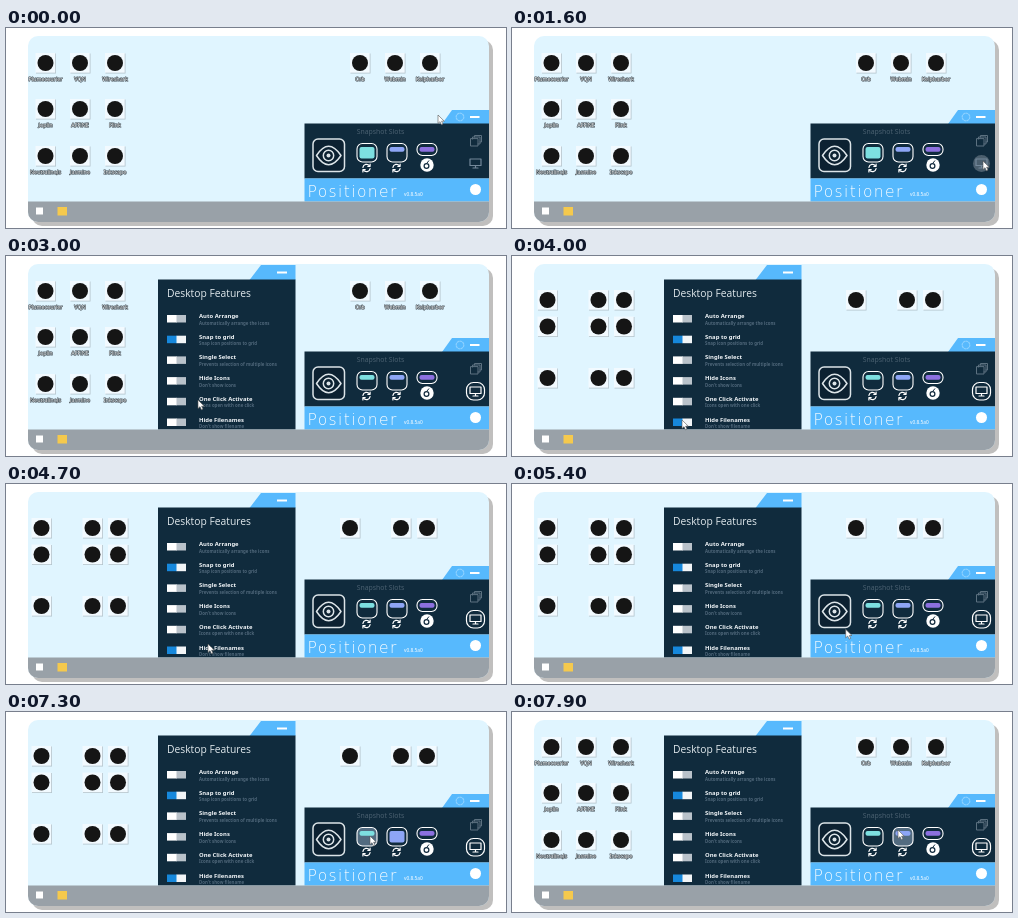
An HTML page that plays this animation: 500x200 px, repeating every 8000 ms.

```html
<!DOCTYPE html>
<html lang="en">
<head>
<meta charset="utf-8">
<title>Desktop icon positions</title>
<style>
html, body { margin: 0; width: 100%; height: 100%; overflow: hidden; background: #fff; }
svg { display: block; width: 500px; height: 200px; }
text { font-family: "Noto Sans", "Open Sans", sans-serif; }
.label { font-size: 5.4px; fill: #fff; text-anchor: middle; paint-order: stroke; stroke: #38434b; stroke-width: 1.1px; stroke-linejoin: round; }
.heading { font: 10.3px "Open Sans", "Noto Sans", sans-serif; fill: #e2eaee; }
.option { font-size: 5.9px; font-weight: 600; fill: #f3f7fa; }
.hint { font-size: 4.4px; font-weight: 600; fill: #50687b; }
.brand { font: 200 15.5px "DejaVu Sans", sans-serif; letter-spacing: 1.4px; fill: #fff; }
.line { fill: none; stroke: #fff; stroke-width: 1.2; stroke-linecap: round; stroke-linejoin: round; }
.dim { stroke: #5c7180; stroke-width: 1; }
.eye { stroke: #dce4e8; stroke-width: 1.5; }
</style>
</head>
<body>
<svg viewBox="0 0 500 200">
  <defs>
    <clipPath id="screen"><rect x="22" y="8" width="461" height="186" rx="10"/></clipPath>
    <g id="refresh" class="line">
      <path d="M-3.6 -.6A3.7 3.7 0 0 1 3 -2.2M3.6 .6A3.7 3.7 0 0 1 -3 2.2"/>
      <path d="M3.6 -4V-1.7H1.3M-3.6 4V1.7H-1.3"/>
    </g>
  </defs>
  <rect x="26" y="12" width="461" height="186" rx="10" fill="#c0bfbe"/>
  <g clip-path="url(#screen)">
    <rect x="22" y="8" width="461" height="186" fill="#e0f5ff"/>
    <g id="icons"></g>

    <g id="features">
      <path d="M243.500 24L255 9H289.500V24Z" fill="#57b9fd"/>
      <path d="M271 16.500H281" stroke="#fff" stroke-width="2"/>
      <rect x="152" y="23.500" width="137.500" height="150" fill="#102b3d"/>
      <text class="heading" x="161" y="41">Desktop Features</text>
      <g id="options"></g>
    </g>

    <path d="M436 96L446 82H483V96Z" fill="#57b9fd"/>
    <circle class="line" cx="454" cy="89" r="3.800" style="stroke:#8bd0ff;stroke-dasharray:1.600 1.300"/>
    <path d="M464 89H473.500" stroke="#fff" stroke-width="2"/>
    <rect x="298.500" y="95.500" width="184.500" height="55" fill="#102b3d"/>
    <rect x="298.500" y="150.500" width="184.500" height="23" fill="#57b9fd"/>
    <text x="374.500" y="106" font-size="6.900" fill="#4a6070" text-anchor="middle">Snapshot Slots</text>
    <rect class="eye" x="307" y="111" width="31.500" height="32.500" rx="5" fill="#0c2131"/>
    <path class="line eye" d="M310.500 127.500Q322.500 109 335 127.500Q322.500 146 310.500 127.500Z"/>
    <circle class="line eye" cx="322.500" cy="127.500" r="5.200"/>
    <circle cx="322.500" cy="127.500" r="2" fill="#dce4e8"/>
    <g id="slots"></g>
    <use id="refresh0" href="#refresh" x="360.500" y="140"/>
    <use id="refresh1" href="#refresh" x="390.500" y="140"/>
    <g id="saving" class="line" style="stroke:#8795a1">
      <circle cx="390.500" cy="139.500" r="3.600" fill="#5f7382"/><path d="M390.500 136.500V139.500H392.500"/>
    </g>
    <circle cx="421" cy="137" r="6.700" fill="#fff"/>
    <circle cx="420.500" cy="138" r="2.400" fill="none" stroke="#10293c" stroke-width="1.200"/>
    <path d="M421 135L423 132.500" stroke="#10293c"/>
    <g class="line dim">
      <path d="M464.500 111V118H472V111Z"/><path d="M466.500 111V109H474V116H472M468.500 109V107.500H475.500V114H474"/>
    </g>
    <circle id="monitorHover" cx="469.500" cy="135.500" r="8.500" fill="#4b5f6e"/>
    <rect id="monitorActive" class="line" x="460.500" y="126.500" width="18" height="17.500" rx="7"/>
    <path id="monitor" class="line" d="M464 131H475V137.500H464ZM469.500 137.500V140M467 140H472"/>
    <text class="brand" x="301.500" y="168.500">Positioner</text>
    <text x="398" y="168" font-size="4.800" fill="#fff">v0.8.5a0</text>
    <circle cx="469.500" cy="161.500" r="5.500" fill="#fff"/>

    <rect x="22" y="173.500" width="461" height="21" fill="#99a1a8"/>
    <rect x="30" y="179.500" width="7" height="7" fill="#fff"/>
    <rect x="51.500" y="179" width="9.500" height="8.500" fill="#f5c94d"/>
  </g>
  <path id="cursor" d="M0 0V8.500L2 6.700L3.400 9.800L5 9.100L3.600 6.200H6.300Z" fill="#fff" stroke="#555" stroke-width=".6"/>
</svg>
<script>
const LOOP = 8000, STEP = 100;
const OPEN = 2000, HIDE_NAMES = 4000, SAVE = 5800, RESTORE = 7600;
const $ = id => document.getElementById(id);

function add(parent, tag, attrs, text) {
  const node = document.createElementNS("http://www.w3.org/2000/svg", tag);
  for (const key in attrs) node.setAttribute(key, attrs[key]);
  if (text) node.textContent = text;
  return parent.appendChild(node);
}
const show = (node, on) => { node.style.visibility = on ? "inherit" : "hidden"; };
const within = (t, from, to) => t >= from && t < to;
const ramp = (t, from, length) => Math.min(1, Math.max(0, (t - from) / length));

const names = [
  ["Plumecourier", "VQN", "Wireshark", "Orb", "Webmin", "Kelpharbor"],
  ["Joplin", "AFFiNE", "Flink"],
  ["NeutralinoJs", "Jasmine", "Inkscape"]
];
const looseX = [39.5, 74, 109, 354, 389, 424], tightX = [35.5, 86.5, 112, 344, 395, 421];
const looseY = [35, 81, 128], tightY = [44, 70.5, 122];
const icons = names.flatMap((row, r) => row.map((name, c) => {
  const group = add($("icons"), "g");
  add(group, "rect", { x: -9.5, y: -9.5, width: 20, height: 20, fill: "#b4c4cc" });
  add(group, "rect", { x: -10, y: -10, width: 19.7, height: 19.7, fill: "#f2faff" });
  add(group, "circle", { r: 8, fill: "#151515" });
  const label = add(group, "text", { class: "label", y: 18 }, name);
  return { group, label, r, c };
}));

const toggles = [
  ["Auto Arrange", "Automatically arrange the icons"],
  ["Snap to grid", "Snap icon positions to grid"],
  ["Single Select", "Prevents selection of multiple icons"],
  ["Hide Icons", "Don't show icons"],
  ["One Click Activate", "Icons open with one click"],
  ["Hide Filenames", "Don't show filename"]
].map(([name, hint], i) => {
  const row = add($("options"), "g", { transform: `translate(161 ${62.5 + i * 20.7})` });
  const left = add(row, "rect", { y: -3.5, width: 10, height: 7.5 });
  const right = add(row, "rect", { x: 9.5, y: -3.5, width: 9.5, height: 7.5 });
  add(row, "text", { class: "option", x: 32, y: -0.5 }, name);
  add(row, "text", { class: "hint", x: 32, y: 6 }, hint);
  return on => {
    left.setAttribute("fill", on ? "#1688dc" : "#fff");
    right.setAttribute("fill", on ? "#f2f5f7" : "#b9c2ca");
  };
});

const slots = ["#7ddfe0", "#8da5f5", "#8c70df"].map((color, i) => {
  const x = 361 + 30 * i, height = i < 2 ? 18.5 : 12;
  const frame = add($("slots"), "rect", { x: x - 10, y: 115.5, width: 20, height, rx: 5.5, stroke: "#fff", "stroke-width": 1.1 });
  const fill = add($("slots"), "rect", { x: x - 7.5, y: 119, width: 15, rx: 2, fill: color });
  return (level, hover) => {
    frame.setAttribute("fill", hover ? "#526b80" : "#102b3d");
    fill.setAttribute("height", 4.7 + 6.8 * level);
  };
});

// time, x, y of the pointer tip
const path = [
  [0, 432, 87], [200, 432, 87], [300, 434, 89], [1000, 434, 89], [1600, 471, 133],
  [2100, 471, 133], [2700, 214, 137], [3000, 192, 144], [3200, 180, 155],
  [3400, 178, 157], [3800, 170, 164], [4200, 170, 164], [4700, 202, 160],
  [4900, 212, 159], [5700, 390, 139], [6600, 390, 139], [6800, 385, 136],
  [7000, 380, 132], [7300, 364, 124], [7600, 364, 124], [7900, 386, 118], [8000, 386, 118]
];
function pointer(t) {
  const i = path.findIndex(p => p[0] > t), a = path[i - 1], b = path[i];
  const k = (t - a[0]) / (b[0] - a[0]), ease = k * k * (3 - 2 * k);
  return [a[1] + (b[1] - a[1]) * ease, a[2] + (b[2] - a[2]) * ease];
}

function draw(now) {
  const t = Math.floor(now % LOOP / STEP) * STEP;
  const open = t >= OPEN, tight = within(t, HIDE_NAMES, RESTORE);

  for (const { group, label, r, c } of icons) {
    const x = (tight ? tightX : looseX)[c], y = (tight ? tightY : looseY)[r];
    group.setAttribute("transform", `translate(${x} ${y})`);
    show(label, !tight);
  }
  show($("features"), open);
  $("features").style.opacity = ramp(t, OPEN - STEP, 300);
  toggles.forEach((set, i) => set(i === 1 || i === 5 && t >= HIDE_NAMES));

  slots[0](1 - ramp(t, OPEN, 600), within(t, 7200, 7700));
  slots[1](ramp(t, SAVE, 600) - ramp(t, RESTORE, 200), t >= 7800);
  slots[2](0, false);
  const saving = within(t, 5700, 6700);
  show($("refresh1"), !saving);
  show($("saving"), saving);
  show($("monitorHover"), within(t, 1500, 2200));
  show($("monitorActive"), open);
  $("monitor").style.stroke = open ? "#fff" : "#73889a";

  $("cursor").setAttribute("transform", `translate(${pointer(t)})`);
}
function tick() {
  draw(performance.now());
  requestAnimationFrame(tick);
}
tick();
</script>
</body>
</html>
```
